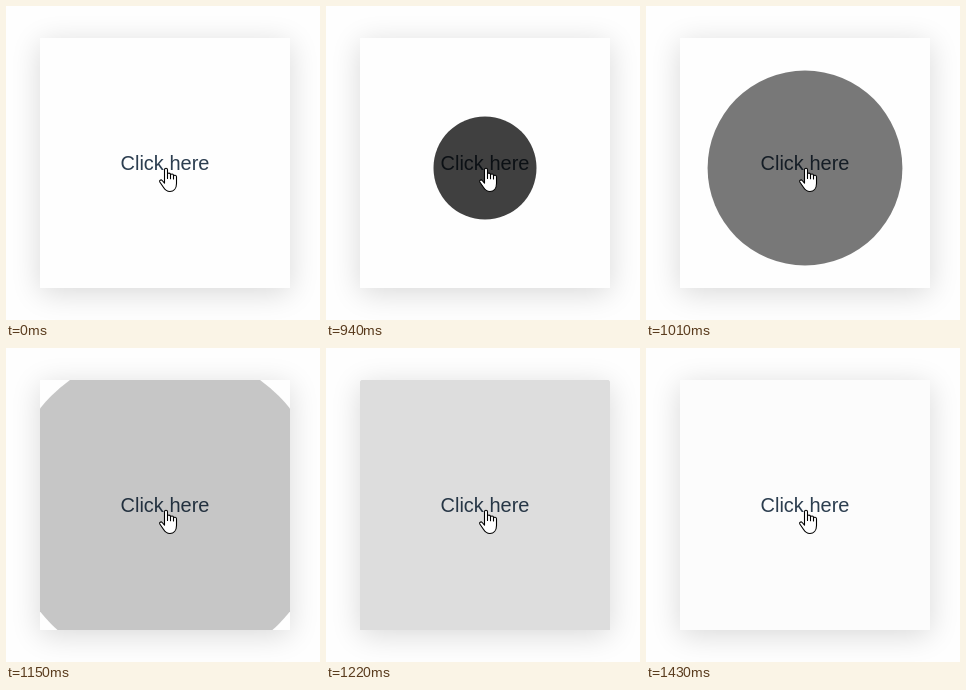
Write an HTML page that moves like this. It is 314 by 314 pixels and loops after 1.5 s.

```html
<!DOCTYPE html>
<html lang="en">
<head>
<meta charset="utf-8">
<title>Click ripple</title>
<style>
  html, body { margin: 0; width: 100%; height: 100%; overflow: hidden; background: #fefefe; }
  svg { display: block; width: 100%; height: 100%; }
  .shadow { fill: #000; opacity: .15; filter: blur(15px); }
  text { font: 20px "Liberation Sans", Arial, sans-serif; fill: #2c3e50; text-anchor: middle; }
  .hand { fill: #fff; stroke: #000; stroke-width: 1.1; stroke-linejoin: round; stroke-linecap: round; }
</style>
</head>
<body>
<svg viewBox="0 0 314 314">
  <defs>
    <clipPath id="card"><rect x="34" y="32" width="250" height="250"/></clipPath>
  </defs>
  <rect class="shadow" x="34" y="37" width="250" height="250"/>
  <rect x="34" y="32" width="250" height="250" fill="#fefefe"/>
  <text x="159" y="164">Click here</text>
  <g clip-path="url(#card)"><circle id="ripple" cx="159" cy="162" r="0"/></g>
  <g class="hand">
    <path d="M158.5 177.2V163.8C158.5 161.7 161.5 161.7 161.5 163.8V169
      V168.2C161.5 166.7 164.5 166.7 164.5 168.4V169.2C164.7 167.4 167.5 167.6 167.5 169.4
      V170.2C167.8 168.7 170.5 168.9 170.5 170.8V177.5C170.5 182.6 167.6 185.5 163.9 185.5
      C160.6 185.5 159.1 184.1 157.4 181.3L153.8 176C152.9 174.4 155 173.2 156.2 174.5Z"/>
    <path d="M161.5 169V172.5M164.5 169.2V172.7M167.5 170.2V173" fill="none"/>
  </g>
</svg>
<script>
const LOOP = 1500, CLICK = 870, STEP = 70, LEAD = 56, DURATION = 700, MAX_RADIUS = 206;
const ripple = document.getElementById('ripple');

const bezier = (u, a, b) => 3 * a * u * (1 - u) ** 2 + 3 * b * u * u * (1 - u) + u ** 3;

// cubic-bezier(.25, .1, .25, 1), solved by bisection
function ease(t) {
  let low = 0, high = 1;
  for (let i = 0; i < 30; i++) {
    const mid = (low + high) / 2;
    if (bezier(mid, .25, .25) < t) low = mid; else high = mid;
  }
  return bezier(low, .1, 1);
}

function draw(now) {
  const time = now % LOOP;
  const active = time >= CLICK;
  // the ripple advances in fixed steps
  const elapsed = LEAD + Math.floor((time - CLICK) / STEP) * STEP;
  const progress = active ? ease(Math.min(1, elapsed / DURATION)) : 0;
  ripple.setAttribute('r', MAX_RADIUS * progress);
  ripple.setAttribute('opacity', active ? 1 - progress : 0);
}

const start = performance.now();
function tick() {
  draw(performance.now() - start);
  requestAnimationFrame(tick);
}
tick();
</script>
</body>
</html>
```
